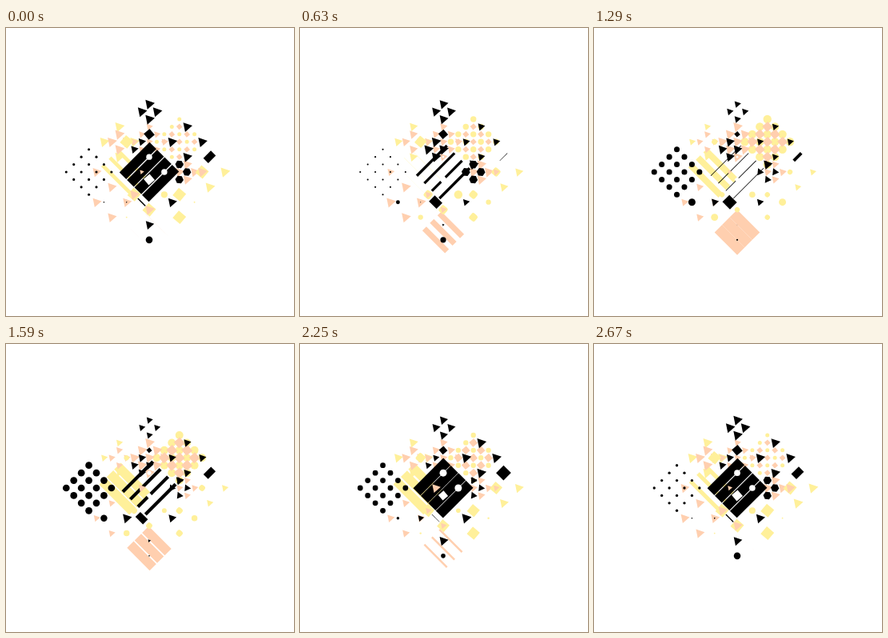
Write an HTML page with a canvas that moves like this. It is 360 px wide and 360 px high and loops after 2.7 s.

```html
<!DOCTYPE html>
<html lang="en">
<head>
<meta charset="utf-8">
<title>Pulsing lattice</title>
<style>
html, body { margin: 0; width: 100%; height: 100%; overflow: hidden; background: #fff; }
canvas { display: block; width: 360px; height: 360px; }
</style>
</head>
<body>
<canvas id="stage" width="360" height="360"></canvas>
<script>
const LOOP = 2700, UNIT = 9.43, CELL = UNIT * Math.SQRT2;
const BLACK = '#000', YELLOW = '#fff09a', PEACH = '#ffcfaf', WHITE = '#fff';
const ctx = document.getElementById('stage').getContext('2d');
let now = 0;

// 1 at the peak (a fraction of the loop), 0 half a loop away
const wave = peak => (1 + Math.cos((now / LOOP - peak) * 2 * Math.PI)) / 2;

function polygon(r, n, turn) {
  ctx.beginPath();
  for (let k = 0; k < n; k++) {
    const a = turn + k * 2 * Math.PI / n;
    ctx.lineTo(r * Math.cos(a), r * Math.sin(a));
  }
  ctx.fill();
}

function disc(r) {
  ctx.beginPath();
  ctx.arc(0, 0, r, 0, 2 * Math.PI);
  ctx.fill();
}

const triangle = r => polygon(r, 3, -0.2);

// a circle that sharpens into a diamond at its peak
function roundDiamond(r, v) {
  const s = r * (0.9 - 0.19 * v);
  ctx.rotate(Math.PI / 4 - 0.08);
  ctx.beginPath();
  ctx.roundRect(-s, -s, 2 * s, 2 * s, s * Math.max(0, 1 - v * 1.1));
  ctx.fill();
}

const kinds = {
  dot: { min: 0.8, max: 4.5, draw: disc },
  bead: { min: 2.5, max: 5.2, draw: disc },
  tri: { min: 4.8, max: 7.2, draw: triangle },
  pop: { min: 0, max: 7, draw: triangle },
  square: { min: 3.5, max: 7, draw: r => polygon(r, 4, 0.08) },
  gem: { min: 3.5, max: 8.5, draw: roundDiamond },
  blob: { min: 5, max: 5.4, draw: (r, v) => polygon(r, v > 0.55 ? 6 : 3, 0.1) }
};

function place(i, j, color) {
  ctx.save();
  ctx.translate(179 + i * UNIT, 180 + j * UNIT);
  ctx.fillStyle = color;
}

function mark(kind, color, peak, i, j) {
  const { min, max, draw } = kinds[kind], v = wave(peak);
  place(i, j, color);
  draw(min + (max - min) * v, v);
  ctx.restore();
}

// square block of n by n marks on the diagonal lattice around (i, j)
function block(kind, color, peak, i, j, n, step = 1) {
  const mid = (n - 1) / 2;
  for (let a = 0; a < n; a++) {
    for (let b = 0; b < n; b++) {
      const p = (a - mid) * step, q = (b - mid) * step;
      mark(kind, color, peak, i + p + q, j + p - q);
    }
  }
}

// n bars one cell apart; dir 1 runs down to the right, -1 up to the right
function bars(color, peak, i, j, n, cells, dir) {
  const thick = CELL * wave(peak), length = cells * CELL;
  place(i, j, color);
  ctx.rotate(dir * Math.PI / 4);
  for (let k = 0; k < n; k++) {
    ctx.fillRect(-length / 2, (k - (n - 1) / 2) * CELL - thick / 2, length, thick);
  }
  ctx.restore();
}

function drawPastels() {
  bars(YELLOW, 0.7, -3.2, 0.1, 3, 4, 1);
  bars(PEACH, 0.475, 0, 8, 3, 3, 1);
  block('bead', YELLOW, 0.5, 4, -4, 4);
  block('square', PEACH, 0.6, 4, -4, 3);
  block('tri', YELLOW, 0, -4, -4, 2, 2);
  block('tri', PEACH, 0, -4, -4, 2);
  block('tri', PEACH, 0.55, 0, -4, 3);
  block('tri', PEACH, 0.15, -5, 4, 2, 2);
  block('tri', PEACH, 0.15, 5, 0, 2);
  mark('gem', YELLOW, 0.07, -3, -4);
  mark('pop', PEACH, 0.07, -7, 0);
}

function drawBlacks() {
  bars(BLACK, 0.9, 0, 0, 4, 4, -1);
  bars(BLACK, 0.8, 8, -2, 1, 1, -1);
  bars(BLACK, 0.39, -1, 4, 1, 1, 1);
  block('dot', BLACK, 0.65, -8, 0, 4);
  mark('dot', BLACK, 0.5, -6, 4);
  mark('dot', BLACK, 0.07, 0, 9);
  mark('pop', BLACK, 0.9, 0, 7);
  mark('pop', BLACK, 0.63, -3, 4);
  mark('tri', BLACK, 0.85, 3, 4);
  block('tri', BLACK, 0.07, 0, -8, 2);
  block('tri', BLACK, 0.9, 5, -4, 2, 2);
  block('tri', BLACK, 0.3, -1, -3, 2);
  mark('tri', BLACK, 0.33, 4, -1);
  mark('square', BLACK, 0.07, 0, -5);
  block('blob', BLACK, 0.22, 4, 0, 2);
}

function drawAccents() {
  mark('square', WHITE, 0, 0, 1);
  for (const k of [0, 2]) mark('dot', WHITE, 0.85, k, k - 2);
  for (const k of [8, 10]) mark('tri', YELLOW, 0, k, 10 - k);
  mark('dot', YELLOW, 0.44, 6, 4);
  mark('dot', YELLOW, 0.44, -3, 6);
  mark('bead', YELLOW, 0.22, 2, 3);
  for (const k of [4, 6]) mark('gem', YELLOW, 0.95, 4, k === 4 ? 3 : k);
  for (const [i, j] of [[7, 0], [-2, 3], [0, 5]]) {
    mark('gem', YELLOW, 0.97, i, j);
    mark('pop', PEACH, 0.04, i, j);
  }
  mark('pop', PEACH, 0.74, -1, 0);
}

function frame(time) {
  now = time % LOOP;
  ctx.fillStyle = WHITE;
  ctx.fillRect(0, 0, 360, 360);
  drawPastels();
  drawBlacks();
  drawAccents();
  requestAnimationFrame(frame);
}
requestAnimationFrame(frame);
</script>
</body>
</html>
```
